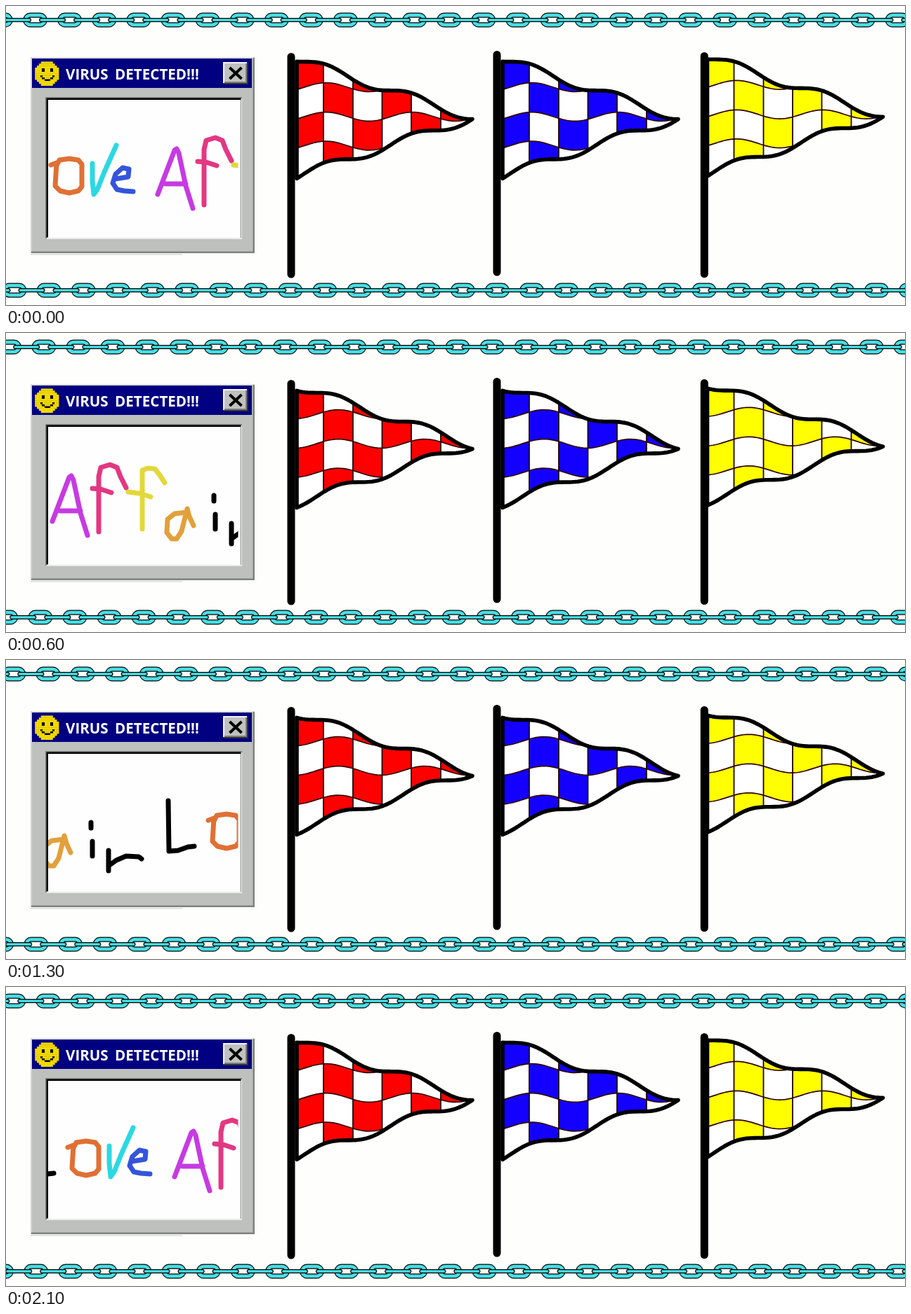
Recreate the animation shown at these times as an HTML page with a canvas. Size 1280 px wide and 427 px high, loop 2200 ms.

```html
<!DOCTYPE html>
<html lang="en">
<head>
<meta charset="utf-8">
<title>Flags and chains</title>
<style>
  html, body { margin: 0; width: 100%; height: 100%; overflow: hidden; background: #fefefc; }
  canvas { display: block; }
</style>
</head>
<body>
<canvas id="stage" width="1280" height="427"></canvas>
<script>
const ctx = document.getElementById('stage').getContext('2d');
const STEP = 100, STEPS = 22;

function rect(color, x, y, w, h) {
  ctx.fillStyle = color;
  ctx.fillRect(x, y, w, h);
}

function stroke(color, width, path) {
  ctx.strokeStyle = color;
  ctx.lineWidth = width;
  ctx.stroke(path);
}

// ---- Chains ----
const LINK_GAP = 49.1;
const link = new Path2D();
link.roundRect(-13.8, -6.8, 27.6, 13.6, 6.8);
const bar = new Path2D('M8.500 0H40.600');

function drawChain(offset, y) {
  const first = ((offset % LINK_GAP) + LINK_GAP) % LINK_GAP - 2 * LINK_GAP;
  const pieces = [[link, 7.2, 4.8], [bar, 6, 3.6]];
  for (const [path, outer, inner] of pieces) {
    for (let x = first; x < 1320; x += LINK_GAP) {
      ctx.save();
      ctx.translate(x, y);
      stroke('#000', outer, path);
      stroke('#48dee4', inner, path);
      ctx.restore();
    }
  }
}

// ---- Flags, in the coordinates of the first one ----
const LEFT = 414, TIP = 664, WAVE = 123, SWELL = 6.4;
const COLUMNS = [LEFT, 452, 494, 535.5, 577, 619, TIP];
const ROWS = [40, 116, 158, 199.5, 280];
const flags = [
  { color: '#f00', dx: 0, dy: 0, pole: [406, 72.5, 383] },
  { color: '#1400ff', dx: 293, dy: 0, pole: [699, 69.5, 380] },
  { color: '#ff0', dx: 584.5, dy: -3.3, pole: [994.3, 71.5, 382.5] }
];

function drawFlag({ color, dx, dy, pole }, k) {
  const crest = 455.5 - (k % 7) * WAVE / 7;
  const ripple = x => -SWELL * Math.cos(2 * Math.PI * (x - crest) / WAVE);
  const curve = (path, base, from, to) => {
    const n = Math.ceil(Math.abs(to - from) / 4);
    for (let i = 0; i <= n; i++) {
      const x = from + (to - from) * i / n;
      path.lineTo(x, base(x) + ripple(x));
    }
  };
  const edge = start => x => start + (159.5 - start) * (x - LEFT) / (TIP - LEFT);

  const outline = new Path2D();
  curve(outline, edge(76), LEFT, TIP);
  curve(outline, edge(243), TIP, LEFT);
  outline.closePath();

  ctx.save();
  ctx.translate(dx, dy);
  ctx.fillStyle = '#fff';
  ctx.fill(outline);

  ctx.save();
  ctx.clip(outline);
  ctx.fillStyle = color;
  for (let c = 0; c < 6; c++) {
    for (let r = c % 2; r < 4; r += 2) {
      const cell = new Path2D();
      curve(cell, () => ROWS[r], COLUMNS[c], COLUMNS[c + 1]);
      curve(cell, () => ROWS[r + 1], COLUMNS[c + 1], COLUMNS[c]);
      ctx.fill(cell);
    }
  }
  const grid = new Path2D();
  for (const x of COLUMNS.slice(1, 6)) {
    grid.moveTo(x, 40);
    grid.lineTo(x, 280);
  }
  stroke('#1c0000', 1.8, grid);
  for (const y of ROWS.slice(1, 4)) {
    const line = new Path2D();
    curve(line, () => y, LEFT, TIP);
    stroke('#300000', 1.7, line);
  }
  ctx.restore();
  stroke('#000', 5.6, outline);
  ctx.restore();

  const [x, top, bottom] = pole;
  stroke('#000', 11, new Path2D(`M${x} ${top}V${bottom}`));
}

// ---- Window ----
function drawSmiley() {
  const px = 2.85, cx = 58.3, cy = 96.5;
  for (let row = -6; row < 6; row++) {
    const half = Math.round(Math.sqrt(37 - (row + 0.5) ** 2));
    rect('#f0d800', cx - half * px, cy + row * px, 2 * half * px, px + 0.4);
  }
  rect('#000', 51, 89, 4, 5);
  rect('#000', 63, 89, 4, 5);
  for (const [x, y, w] of [[49, 99, 3], [51, 102, 4], [55, 104.5, 8], [63, 102, 4], [66, 99, 3]]) {
    rect('#000', x, y, w, 2.5);
  }
}

function drawWindow() {
  rect('#bdc0bc', 35, 73, 319, 280);
  rect('#dcdedb', 35, 73, 319, 2);
  rect('#d4d6d3', 35, 73, 2, 280);
  rect('#808280', 351.5, 74, 2.5, 279);
  rect('#808280', 36, 350.5, 318, 2.5);
  rect('#d8dad8', 35, 354, 216, 1.5);
  rect('#000080', 37, 75, 313, 42);
  drawSmiley();

  ctx.fillStyle = '#fff';
  ctx.font = 'bold 20.6px "Open Sans", sans-serif';
  ctx.wordSpacing = '4px';
  ctx.fillText('VIRUS DETECTED!!!', 85, 104.5);

  rect('#303030', 309, 80, 36, 32);
  rect('#f4f4f4', 309, 80, 34, 30);
  rect('#808080', 311, 82, 32, 28);
  rect('#c0c2c0', 311, 82, 30, 26);
  ctx.lineCap = 'butt';
  stroke('#000', 4, new Path2D('M318.500 88L335.500 104M335.500 88L318.500 104'));
  ctx.lineCap = 'round';

  rect('#808280', 56, 130, 280, 202);
  rect('#e8eae8', 58, 132, 278, 201);
  rect('#000', 57.5, 131.5, 277, 199);
  rect('#a8aaa8', 60, 134, 275, 197);
  rect('#fefefe', 60, 134, 273.5, 197);
}

// ---- Handwriting ----
const letters = [
  ['#000', 'M7 199L8 271L21 270L35 265L44 264'],
  ['#e07034', 'M64 227L72 224L70 257L77 264L90 267L103 264L108 258L108 226L103 220L90 218L76 220L72 228'],
  ['#2cd8e2', 'M123 225L123 250L125 269L130 262L140 237L157 199'],
  ['#3454dc', 'M155 247L174 244L175 233L166 231L156 240L152 253L158 262L168 264L181 265'],
  ['#c63ae2', 'M216 269L240 206L243 204L246 210L256 257L266 289M227 254L256 254'],
  ['#e23882', 'M282 284L282 205L285 192L298 188L308 192L313 205L321 221M273 222L285 223L300 228'],
  ['#e2d83a', 'M344 280L344 196L352 193L362 194L369 203L376 214M324 227L340 229L356 234'],
  ['#e2a03c', 'M408 256L390 258L380 266L379 285L386 294L393 294L400 283L408 251L411 262L417 275'],
  ['#000', 'M446 232L446 240M448 259L448 280'],
  ['#000', 'M471 272L471 301M471 294L482 286L496 280L514 281L518 284']
].map(([color, d]) => [color, new Path2D(d)]);

function drawWriting(k) {
  ctx.save();
  ctx.beginPath();
  ctx.rect(60, 134, 270.5, 196);
  ctx.clip();
  ctx.translate(-25 * k, 0);
  for (let copy = 0; copy < 2; copy++) {
    for (const [color, path] of letters) stroke(color, 7, path);
    ctx.translate(549, 2);
  }
  ctx.restore();
}

function draw(k) {
  rect('#fefefc', 0, 0, 1280, 427);
  ctx.lineCap = ctx.lineJoin = 'round';
  const slide = k * LINK_GAP / 8;
  drawChain(41.5 - slide, 20);
  drawChain(12 + slide, 406);
  drawWindow();
  drawWriting(k);
  for (const flag of flags) drawFlag(flag, k);
}

const start = performance.now();
let shown = -1;
function tick() {
  const k = Math.floor((performance.now() - start) / STEP) % STEPS;
  if (k !== shown) draw(shown = k);
  requestAnimationFrame(tick);
}
tick();
</script>
</body>
</html>
```
